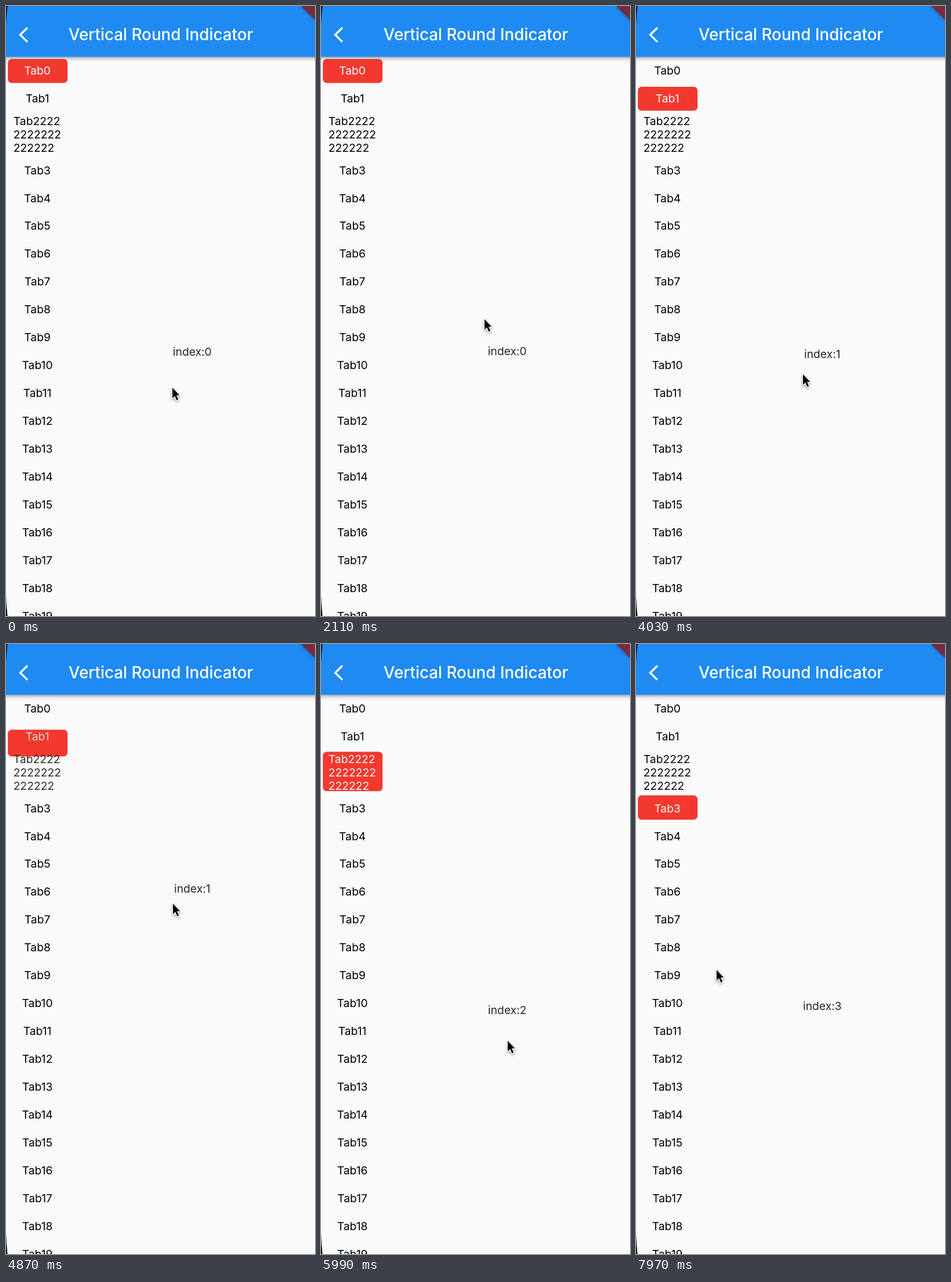
An HTML page with a canvas for the animation above (7.99 s loop, 533 by 1050 pixels).

```html
<!DOCTYPE html>
<html lang="en">
<head>
<meta charset="utf-8">
<title>Vertical Round Indicator</title>
<style>
  html, body { margin: 0; width: 100%; height: 100%; overflow: hidden; background: #fafafa; }
  canvas { display: block; width: 533px; height: 1050px; }
</style>
</head>
<body>
<canvas id="stage"></canvas>
<script>
const W = 533, H = 1050, LOOP = 7990;
const BAR = 88, PAGE = 1014, TAB = 47.95, TALL_TAB = 75.5, TAB_COUNT = 20;
const FONT = 'Inter, Roboto, sans-serif';
const canvas = document.getElementById('stage');
const ctx = canvas.getContext('2d');
const ratio = window.devicePixelRatio || 1;
canvas.width = W * ratio;
canvas.height = H * ratio;
ctx.scale(ratio, ratio);

// Playback runs in 740 ms bursts, each followed by a 100 ms pause that counts as one 40 ms step.
const FIRST = 1650, BURST = 740, PAUSE = 100, STEP = 40;

function burstAt(t) {
  const cycle = BURST + PAUSE;
  const index = Math.max(0, Math.floor((t - FIRST) / cycle));
  return { index, start: FIRST + index * cycle, phase: Math.min(t - FIRST - index * cycle, BURST) };
}

const swipes = [
  { start: 440, end: 700, release: 700, distance: 180 },
  { start: 2515, end: 3120, release: 3120, distance: 231 },
  { start: 4560, end: 4860, release: 4949, distance: 300 }
];

// An accelerating drag, then an overdamped spring to the next page.
function swipeOffset({ start, end, release, distance }, time) {
  if (time < release) {
    const k = Math.min(1, Math.max(0, (time - start) / (end - start)));
    return distance * k * k;
  }
  const u = (time - release) / 1000;
  return PAGE - (PAGE - distance) * (4 * Math.exp(-3.69 * u) - Math.exp(-8.96 * u)) / 3;
}

function scrollOffset({ index, phase }) {
  const time = index * (BURST + STEP) + phase;
  return swipes.reduce((sum, swipe) => sum + swipeOffset(swipe, time), 0);
}

const pointerStart = { x: 287, y: 657 };
const pointerMoves = [
  { from: 480, to: 780, x: 282, y: 712 },
  { from: 1600, to: 2110, x: 282, y: 539 },
  { from: 2210, to: 2500, x: 295, y: 360 },
  { from: 2600, to: 3230, x: 282, y: 507 },
  { from: 3330, to: 4030, x: 288, y: 634 },
  { from: 4400, to: 4870, x: 288, y: 447 },
  { from: 4870, to: 5330, x: 361, y: 400 },
  { from: 5330, to: 5980, x: 322, y: 683 },
  { from: 6450, to: 6870, x: 322, y: 434 },
  { from: 6970, to: 7970, x: 139, y: 561 }
];

function pointerAt(t) {
  return pointerMoves.reduce((p, move) => {
    const k = Math.min(1, Math.max(0, (t - move.from) / (move.to - move.from)));
    const ease = k * k * (3 - 2 * k);
    return { x: p.x + (move.x - p.x) * ease, y: p.y + (move.y - p.y) * ease };
  }, pointerStart);
}

const tabs = [];
for (let i = 0, top = BAR; i < TAB_COUNT; i++) {
  const height = i === 2 ? TALL_TAB : TAB;
  tabs.push({ top, height });
  top += height;
}

function text(label, x, y, color, align = 'center', font = '400 19.3px') {
  ctx.font = `${font} ${FONT}`;
  ctx.textAlign = align;
  ctx.fillStyle = color;
  ctx.fillText(label, x, Math.round(y));
}

function polygon(points) {
  ctx.beginPath();
  points.forEach(([x, y]) => ctx.lineTo(x, y));
  ctx.closePath();
}

function withShadow(color, blur, dy, draw) {
  ctx.save();
  ctx.shadowColor = color;
  ctx.shadowBlur = blur * ratio;
  ctx.shadowOffsetY = dy * ratio;
  draw();
  ctx.restore();
}

function drawIndicator(page) {
  const i = Math.floor(page), k = page - i;
  const a = tabs[i], b = tabs[i + 1];
  const top = a.top + (b.top - a.top) * k;
  const height = a.height + (b.height - a.height) * k;
  ctx.fillStyle = '#f3392f';
  ctx.beginPath();
  ctx.roundRect(3.2, top + 3.3, 103, height - 6.8, 6.5);
  ctx.fill();
}

function drawTabs(page) {
  tabs.forEach(({ top, height }, i) => {
    const shade = Math.round(255 * Math.max(0, 1 - Math.abs(page - i)));
    const color = `rgb(${shade},${shade},${shade})`;
    const baseline = top + height / 2 + 6.2;
    if (i === 2) {
      ['Tab2222', '2222222', '222222'].forEach((line, row) =>
        text(line, 12.8, baseline + (row - 1) * 23.2, color, 'left'));
    } else {
      text('Tab' + i, 54.1, baseline, color);
    }
  });
}

function drawBar() {
  withShadow('rgba(0,0,0,.42)', 7, 2.5, () => {
    ctx.fillStyle = '#1e8af2';
    ctx.fillRect(-20, -20, W + 40, BAR + 19.5);
  });
  ctx.strokeStyle = '#fff';
  ctx.lineWidth = 3.4;
  ctx.beginPath();
  ctx.moveTo(37, 37.3);
  ctx.lineTo(24.6, 49.6);
  ctx.lineTo(37, 61.9);
  ctx.stroke();
  text('Vertical Round Indicator', 267, 59, '#fff', 'center', '500 27.8px');
  withShadow('rgba(0,0,0,.4)', 5, 0, () => {
    ctx.fillStyle = '#762d40';
    polygon([[509, 0], [W, 0], [W, 24]]);
    ctx.fill();
  });
}

function drawScreenCorners() {
  ctx.fillStyle = '#000';
  for (const [edge, inner] of [[0, 34], [H, H - 36]]) {
    ctx.beginPath();
    ctx.moveTo(0, edge);
    ctx.lineTo(2.5, edge);
    ctx.quadraticCurveTo(0.6, (edge + inner) / 2, 0, inner);
    ctx.fill();
  }
}

function drawPointer({ x, y }) {
  ctx.save();
  ctx.translate(x, y);
  polygon([[0, 0], [0, 18], [4.2, 14.2], [7.3, 21.5], [10.2, 20.2], [7.1, 13], [12.4, 13]]);
  ctx.lineWidth = 2.4;
  ctx.lineJoin = 'round';
  ctx.strokeStyle = '#fff';
  withShadow('rgba(0,0,0,.4)', 4, 2, () => ctx.stroke());
  ctx.fillStyle = '#000';
  ctx.fill();
  ctx.restore();
}

function render() {
  const t = performance.now() % LOOP;
  const burst = burstAt(t);
  const offset = scrollOffset(burst);
  const page = offset / PAGE;
  ctx.fillStyle = '#fafafa';
  ctx.fillRect(0, 0, W, H);
  for (let i = 0; i < 4; i++) {
    text('index:' + i, 321.3, 602 + i * PAGE - offset, 'rgba(0,0,0,.85)');
  }
  drawIndicator(page);
  drawTabs(page);
  drawBar();
  drawScreenCorners();
  drawPointer(pointerAt(burst.start + burst.phase));
  requestAnimationFrame(render);
}
render();
</script>
</body>
</html>
```
